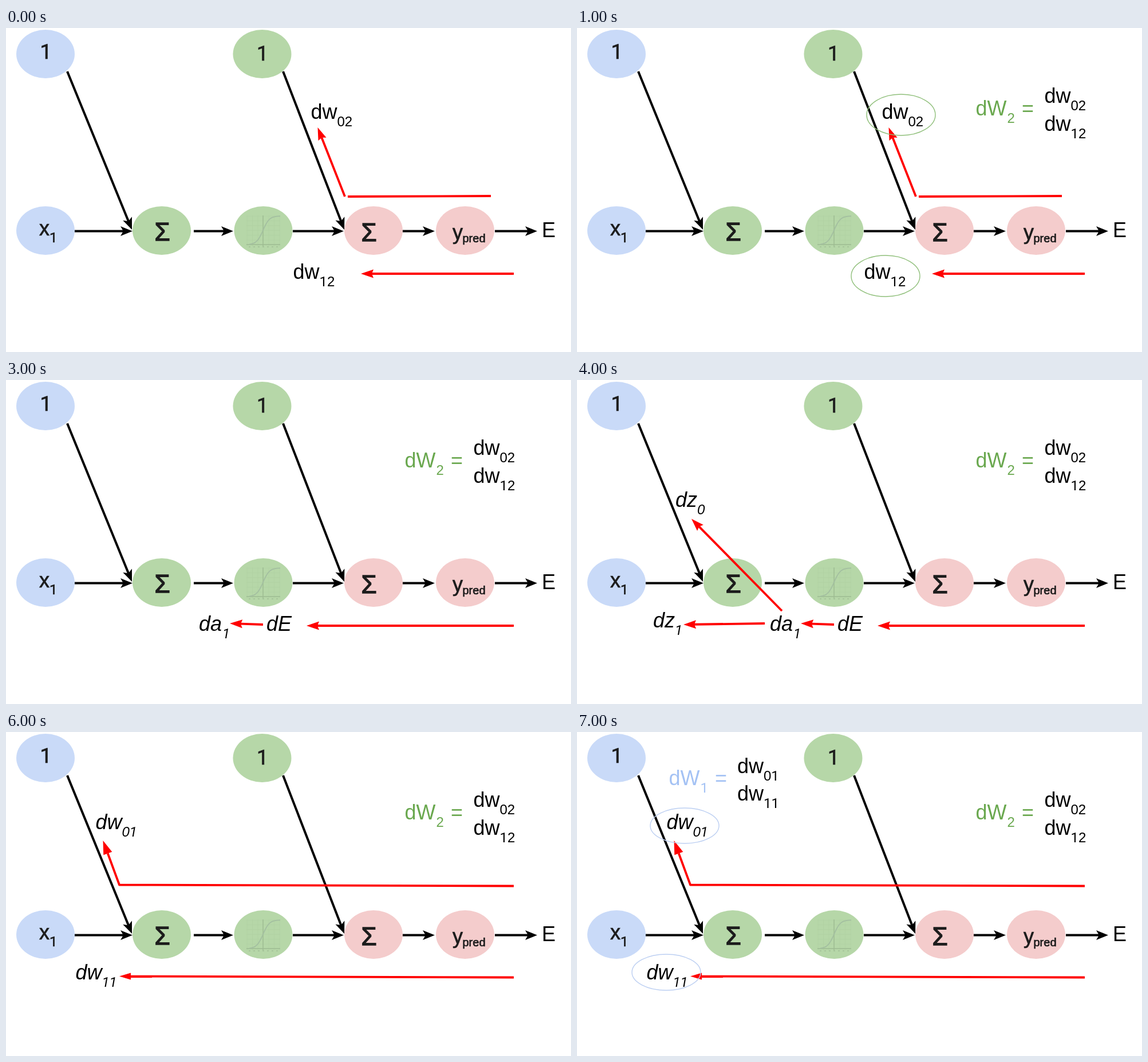
Recreate the animation shown at these times as an HTML page. Size 987 by 567 pixels, loop 8000 ms.

```html
<!DOCTYPE html>
<html lang="de">
<head>
<meta charset="utf-8">
<title>Backpropagation</title>
<style>
  html, body { margin: 0; width: 100%; height: 100%; overflow: hidden; background: #fff; }
  svg { display: block; width: 100%; height: 100%; font-family: "Liberation Sans", Arial, sans-serif; }
  .one { font-family: Roboto, "Open Sans", sans-serif; }
</style>
</head>
<body>
<svg id="stage" viewBox="0 0 987 567"></svg>
<script>
const BLUE = '#c9daf8', GREEN = '#b6d7a8', PINK = '#f4cccc';
const SKY = '#a4c2f4', LEAF = '#6aa84f', RED = '#ff0000', INK = '#1c1c1c';
const STEP = 1000, STEPS = 8;

// Digit one is set in a face whose glyph has no foot.
const glyphs = s => s.replace(/1/g, '<tspan class="one">1</tspan>');

const text = (x, y, s, { size = 36, fill = '#000', style = '' } = {}) =>
  `<text x="${x}" y="${y}" font-size="${size}" fill="${fill}" style="${style}">${glyphs(s)}</text>`;

const label = (x, y, s, sub, { dx, dy = 13, small = 24, ...opt } = {}) =>
  text(x, y, s, opt) + text(x + dx, y + dy, sub, { ...opt, size: small });

const weight = (x, y, sub) => label(x, y, 'dw', sub, { dx: 46 });
const slanted = (x, y, s, sub, dx) => label(x, y, s, sub, { dx, style: 'font-style:italic' });

const node = (cx, cy, fill) => `<ellipse cx="${cx}" cy="${cy}" rx="51" ry="42.5" fill="${fill}"/>`;

const ring = (cx, cy, rx, ry, color) =>
  `<ellipse cx="${cx}" cy="${cy}" rx="${rx}" ry="${ry}" fill="none" stroke="${color}" stroke-width="1.4"/>`;

// Polyline whose last point carries a notched arrowhead.
function arrow(points, { color = '#000', width = 4, len = 21, half = 8.5, notch = 5 } = {}) {
  const [[px, py], [x, y]] = points.slice(-2);
  const angle = Math.atan2(y - py, x - px);
  const inset = len - notch;
  const end = [x - inset * Math.cos(angle), y - inset * Math.sin(angle)];
  const line = [...points.slice(0, -1), end].join(' ');
  return `<polyline points="${line}" fill="none" stroke="${color}" stroke-width="${width}" stroke-linejoin="round"/>` +
    `<path d="M0 0L${-len} ${-half}L${-inset} 0L${-len} ${half}Z" fill="${color}"
      transform="translate(${x} ${y}) rotate(${angle * 180 / Math.PI})"/>`;
}

const red = (points, opt) =>
  arrow(points, { color: RED, width: 3.8, len: 22, half: 7.5, notch: 3, ...opt });

function sigmoidPlot() {
  let grid = '', curve = '';
  for (let i = 0; i <= 6; i++) {
    grid += `M${421 + i * 9.5} 328V383M420 ${329 + i * 8.4}H479`;
  }
  for (let x = 425; x <= 479; x += 2) {
    curve += `${x},${(379 - 50 / (1 + Math.exp((449 - x) / 5.5))).toFixed(1)} `;
  }
  return `<g fill="none">
    <path d="${grid}" stroke="#b0d1a3" stroke-width=".8"/>
    <path d="M449 328V383M420 379H479" stroke="#9dbc92" stroke-width="1.4"/>
    <path d="M424 383H479" stroke="#a6c59a" stroke-width="2" stroke-dasharray="3 5"/>
    <polyline points="${curve}" stroke="#a3bfa0" stroke-width="1.8"/></g>`;
}

function network() {
  const dark = { fill: INK, style: `stroke:${INK};stroke-width:.7` };
  const sum = { size: 44, fill: INK, style: `stroke:${INK};stroke-width:1.4` };
  return node(69, 45.5, BLUE) + node(447.5, 45.5, GREEN) +
    node(69, 354.5, BLUE) + node(272, 354.5, GREEN) + node(449.5, 354.5, GREEN) +
    node(642, 354.5, PINK) + node(802, 354.5, PINK) + sigmoidPlot() +
    text(59.5, 54, '1', dark) + text(438, 56.5, '1', dark) +
    label(58, 362.5, 'x', '1', { ...dark, dx: 18, dy: 12.5 }) +
    text(259.5, 372, 'Σ', sum) + text(620.5, 372.5, 'Σ', sum) +
    label(780, 369.5, 'y', 'pred', { ...dark, dx: 17.5, dy: 5.5, small: 20 }) +
    text(936, 365.5, 'E') +
    arrow([[107, 76], [220, 353]]) + arrow([[484, 76], [591, 353]]) +
    [[120, 221], [328, 397], [501, 590], [693, 749], [854, 928]]
      .map(([a, b]) => arrow([[a, 355.5], [b, 355.5]])).join('');
}

const gradient = (x, y, n, fill) =>
  label(x, y, 'dW', n, { dx: 55, dy: 12.5, fill }) + text(x + 80.5, y, '=', { fill });

// Each part is shown from its first step up to, not including, its last.
const parts = [
  [0, 8, network()],
  [0, 2, weight(532.5, 159, '02') + weight(501.5, 439, '12') +
    `<path d="M847 294L597 295" stroke="${RED}" stroke-width="3.8"/>` +
    red([[592, 295], [544.5, 174]]) + red([[887, 430], [620, 430]])],
  [1, 2, ring(566, 152, 60, 36, '#8fbf7a') + ring(539, 434, 60, 36, '#8fbf7a')],
  [1, 8, gradient(696.5, 153, '2', LEAF) + weight(816.5, 130.5, '02') + weight(816.5, 179.5, '12')],
  [2, 6, text(455, 439, 'dE', { style: 'font-style:italic' }) + red([[887, 430], [525, 430]])],
  [3, 6, slanted(337, 439, 'da', '1', 41) + red([[449, 428], [391, 426]])],
  [4, 6, slanted(172, 222, 'dz', '0', 38) + slanted(133, 433, 'dz', '1', 38) +
    red([[328, 426], [186, 428]]) + red([[358, 404], [200, 243]])],
  [5, 6, text(368.4, 512.6, 'Kettenregel', { size: 37.2, fill: RED, style: 'font-weight:bold' })],
  [6, 8, slanted(156.5, 169.5, 'dw', '01', 46) + slanted(121.5, 432.5, 'dw', '11', 46) +
    red([[887, 269.5], [198, 267.5], [169.5, 190]], { len: 24, half: 8, notch: 0 }) +
    red([[887, 429.5], [198, 427.5]], { len: 20, half: 6, notch: 0 })],
  [7, 8, ring(188, 164, 60, 31, '#bccff2') + ring(156, 420.5, 60, 31.5, '#bccff2') +
    gradient(160.5, 93, '1', SKY) + weight(280, 71.5, '01') + weight(280, 120, '11')],
];

const stage = document.getElementById('stage');
stage.innerHTML = parts.map(p => `<g>${p[2]}</g>`).join('');
const groups = [...stage.children];

const start = performance.now();
function draw() {
  const step = Math.floor((performance.now() - start) / STEP) % STEPS;
  parts.forEach(([from, to], i) => {
    groups[i].style.display = step >= from && step < to ? '' : 'none';
  });
  requestAnimationFrame(draw);
}
draw();
</script>
</body>
</html>
```
